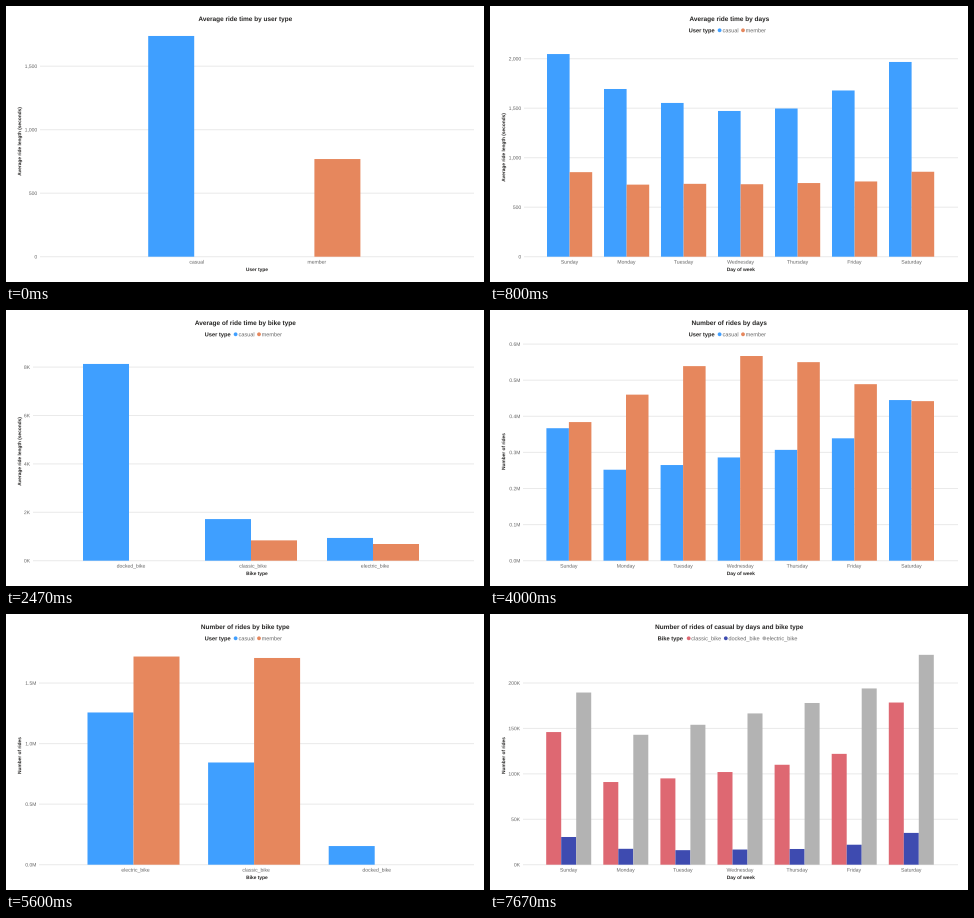
These frames come from a looping animation (478 px wide and 276 px high, 8 s). A matplotlib script:

```python
import matplotlib.pyplot as plt
from matplotlib.animation import FuncAnimation
from matplotlib.patches import Circle, PathPatch, Rectangle
from matplotlib.textpath import TextPath
from matplotlib.transforms import Affine2D

W, H, DPI = 478, 276, 64
BASE, RIGHT, MID = 250.7, 468, 239.3

BLUE, ORANGE = "#3F9FFF", "#E6875D"
RED, NAVY, GRAY = "#DE6872", "#3E4BB0", "#B3B3B3"
GRID, INK, SOFT = "#EAEAEA", "#252423", "#666666"

DAYS = ["Sunday", "Monday", "Tuesday", "Wednesday", "Thursday", "Friday", "Saturday"]
USER_KEY = ("User type", 199, [("casual", BLUE, 229.6, 232.8),
                               ("member", ORANGE, 253, 256)])
BIKE_KEY = ("Bike type", 168, [("classic_bike", RED, 198.7, 201.5),
                               ("docked_bike", NAVY, 235.8, 238.7),
                               ("electric_bike", GRAY, 274.3, 276.8)])

fig = plt.figure(figsize=(W / DPI, H / DPI), dpi=DPI, facecolor="white")
ax = fig.add_axes([0, 0, 1, 1])
ax.set_xlim(0, W)
ax.set_ylim(H, 0)
ax.axis("off")


def add(patch):
    patch.set_snap(False)
    return ax.add_patch(patch)


def label(x, y, text, size, color=INK, ha="center", bold=False, turn=False):
    """Outlined text whose capitals are centred on (x, y); size in pixels."""
    font = {"family": "Liberation Sans", "weight": "bold" if bold else "normal"}
    path = TextPath((0, 0), text, size=size, prop=font)
    box = path.get_extents()
    anchor = {"left": box.x0, "center": (box.x0 + box.x1) / 2, "right": box.x1}[ha]
    place = Affine2D().translate(-anchor, -0.36 * size).scale(1, -1)
    if turn:
        place.rotate_deg(-90)
    place.translate(x, y)
    return add(PathPatch(path.transformed(place), color=color, lw=0, zorder=3))


def legend(title, x, entries):
    parts = [label(x, 24.3, title, 5.7, ha="left", bold=True)]
    for name, color, dot_x, text_x in entries:
        parts.append(add(Circle((dot_x, 24.3), 1.9, color=color, lw=0)))
        parts.append(label(text_x, 24.3, name, 5.55, SOFT, ha="left"))
    return parts


def chart(title, x_title, y_title, ticks, unit, left, cats, first, step,
          bar, series, key=None, y_mid=141.5, shift=0):
    """Clustered columns; unit is pixels per value, ticks are (value, text)."""
    parts = [label(MID, 12.7, title, 6.46, bold=True),
             label(251, 263.3, x_title, 4.85, bold=True),
             label(13.4, y_mid, y_title, 4.8, bold=True, turn=True)]
    for value, text in ticks:
        y = BASE - value * unit
        parts.append(add(Rectangle((left, y - 0.5), RIGHT - left, 1,
                                   color=GRID, lw=0, zorder=0)))
        parts.append(label(left - 3, y, text, 5, SOFT, ha="right"))
    for i, cat in enumerate(cats):
        x = first + i * step
        middle = x + bar * len(series) / 2 + shift
        parts.append(label(middle, 255.8, cat, 5.1, SOFT))
        for j, (color, values) in enumerate(series):
            tall = values[i] * unit
            parts.append(add(Rectangle((x + j * bar, BASE - tall), bar, tall,
                                       color=color, lw=0, zorder=2)))
    if key:
        parts += legend(*key)
    return parts


def ticks(top, step, form):
    return [(i * step, form.format(i * step)) for i in range(top + 1)]


def users(casual, member):
    return [(BLUE, casual), (ORANGE, member)]


LENGTH, RIDES = "Average ride length (seconds)", "Number of rides"

slides = [
    chart("Average ride time by user type", "User type", LENGTH,
          ticks(3, 500, "{:,}"), 0.127, 34, ["casual", "member"],
          142.2, 120.2, 46, users([1738, 0], [0, 769]), y_mid=135.5, shift=2.5),
    chart("Average ride time by days", "Day of week", LENGTH,
          ticks(4, 500, "{:,}"), 0.099, 34, DAYS, 57, 57, 22.6,
          users([2047, 1694, 1553, 1472, 1497, 1679, 1967],
                [854, 728, 736, 732, 744, 760, 858]), USER_KEY),
    chart("Average of ride time by bike type", "Bike type", LENGTH,
          ticks(4, 2, "{}K"), 24.2, 27,
          ["docked_bike", "classic_bike", "electric_bike"], 77, 122, 46,
          users([8.13, 1.72, 0.94], [0, 0.84, 0.69]), USER_KEY, shift=2),
    chart("Number of rides by days", "Day of week", RIDES,
          ticks(6, 0.1, "{:.1f}M"), 361, 33, DAYS, 56.4, 57.1, 22.5,
          users([0.367, 0.252, 0.265, 0.286, 0.307, 0.339, 0.445],
                [0.384, 0.460, 0.539, 0.567, 0.550, 0.489, 0.442]), USER_KEY),
    chart("Number of rides by bike type", "Bike type", RIDES,
          ticks(3, 0.5, "{:.1f}M"), 121.1, 33,
          ["electric_bike", "classic_bike", "docked_bike"], 81.5, 120.6, 46,
          users([1.257, 0.844, 0.154], [1.719, 1.707, 0]), USER_KEY, shift=2),
    chart("Number of rides of casual by days and bike type", "Day of week", RIDES,
          ticks(4, 50, "{}K"), 0.9085, 33, DAYS, 56.2, 57.1, 15,
          [(RED, [146, 91, 95, 102, 110, 122, 178.5]),
           (NAVY, [30.5, 17.5, 16, 16.7, 17.3, 22, 35]),
           (GRAY, [189.5, 143, 154, 166.5, 178, 194, 231])], BIKE_KEY),
]

STEP = 100           # ms per frame
FRAMES = 80
HOLD, LEAD = 16, 8   # frames per slide; the first slide enters halfway


def draw(frame):
    current = (frame + LEAD) // HOLD
    for i, parts in enumerate(slides):
        for part in parts:
            part.set_visible(i == current)
    return []


anim = FuncAnimation(fig, draw, frames=FRAMES, interval=STEP,
                     init_func=lambda: draw(0), repeat=True, repeat_delay=0)
plt.show()
```
